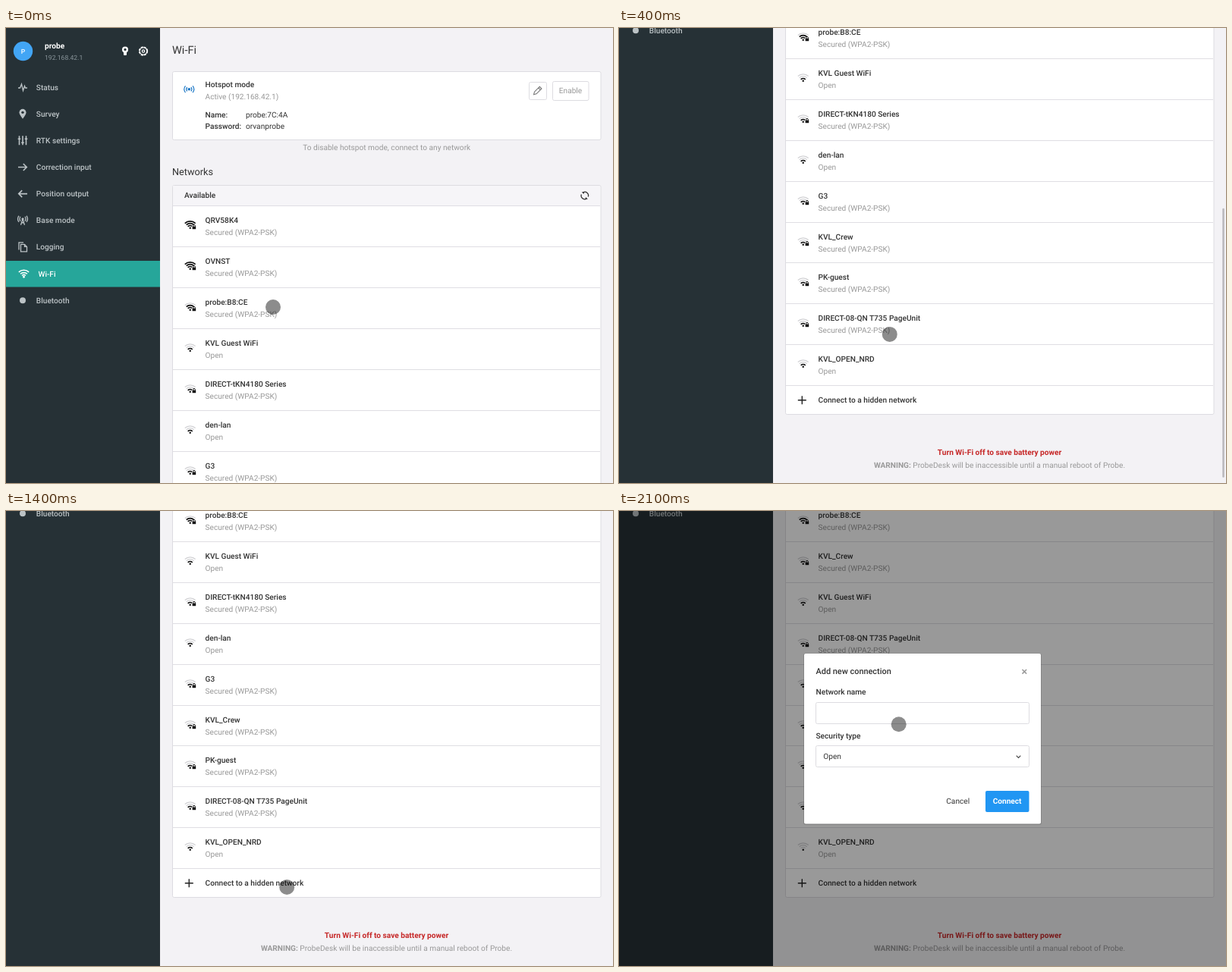
Write an HTML page that moves like this. It is 800 px wide and 600 px high and loops after 2.2 s.

```html
<!DOCTYPE html>
<html lang="en">
<head>
<meta charset="utf-8">
<title>Wi-Fi settings</title>
<style>
  html, body { margin: 0; width: 100%; height: 100%; overflow: hidden; background: #f3f2f5; }
  svg { display: block; width: 800px; height: 600px; }
  text { font: 400 10.15px Roboto, sans-serif; fill: #333; text-rendering: geometricPrecision; white-space: pre; }
  .m { font-weight: 500; }
  .b { font-weight: 700; }
  .g { fill: #999; }
  .c { text-anchor: middle; }
  .nav { font-weight: 500; fill: #bcc3c6; }
  .ip { font-size: 8.6px; fill: #89959a; }
  .h1 { font-size: 14.5px; }
  .h2 { font-size: 12.7px; }
  .dlg { font-size: 10.9px; font-weight: 500; }
  .red { fill: #c62828; }
  .w { fill: #fff; }
  .line { fill: none; stroke: #bcc3c6; stroke-width: 1.3; }
  .box { fill: #fff; stroke: #dddce1; }
</style>
</head>
<body>
<svg id="stage" viewBox="0 0 800 600"></svg>
<script>
const LOOP = 2200, STEP = 100;

const text = (x, y, s, cls = '') => `<text x="${x}" y="${y}" class="${cls}">${s}</text>`;
const rect = (x, y, w, h, fill, more = '') =>
  `<rect x="${x}" y="${y}" width="${w}" height="${h}" fill="${fill}" ${more}/>`;
const box = (x, y, w, h, r = 2) => rect(x + .5, y + .5, w, h, '#fff', `class="box" rx="${r}"`);
const circle = (x, y, r, fill, more = '') => `<circle cx="${x}" cy="${y}" r="${r}" fill="${fill}" ${more}/>`;
const at = (x, y, body) => `<g transform="translate(${x} ${y})">${body}</g>`;
const line = (d, more = '') => `<path d="${d}" class="line" ${more}/>`;
const stroke = (d, color, w) => `<path d="${d}" fill="none" stroke="${color}" stroke-width="${w}"/>`;

// Arc above the origin, spanning 43 degrees to each side
const arc = r => `M${-.68 * r} ${-.73 * r}A${r} ${r} 0 0 1 ${.68 * r} ${-.73 * r}`;

function signal(level, locked) {
  const waves = [4.4, 7.3, 10.2].map((r, i) =>
    level > i ? stroke(arc(r), '#111', 1.7) : stroke(arc(r), '#d2d2d5', 1.3)).join('');
  const lock = rect(2.3, -4.6, 5.8, 5.2, '#fff') + rect(2.9, -3.4, 4.6, 3.6, '#111') +
    stroke('M3.8 -3.2v-1a1.4 1.4 0 0 1 2.8 0v1', '#111', 1);
  return waves + circle(0, -1.2, 1.2, '#111') + (locked ? lock : '');
}

const icons = [
  line('M-6 1h2.5l2 -5l2 8.5l2 -6l1 2.5h2.5'),
  `<path d="M0 6.5C-3 2.5 -4.5 .5 -4.5 -1.8a4.5 4.5 0 0 1 9 0C4.5 .5 3 2.5 0 6.5z" fill="#bcc3c6"/>` + circle(0, -1.8, 1.7, '#263136'),
  line('M-4.5 -6v12M0 -6v12M4.5 -6v12M-6.3 -2h3.6M-1.8 3h3.6M2.7 -2h3.6', 'style="stroke-width:1.6"'),
  line('M-6 0h11M.8 -4.5l4.5 4.5l-4.5 4.5', 'style="stroke-width:1.6"'),
  line('M6 0h-11M-.8 -4.5l-4.5 4.5l4.5 4.5', 'style="stroke-width:1.6"'),
  circle(0, -2, 1.6, '#bcc3c6') + line('M0 -2l-2.5 8M0 -2l2.5 8M-1.5 3h3M-3 -5q-2 3 0 6M3 -5q2 3 0 6M-5 -6q-3 4 0 8M5 -6q3 4 0 8'),
  line('M-2.5 -3.5h5l3 3v6.5h-8zM-5 3.5v-9.5h6M2.5 -3.5v3h3'),
  [9.8, 6.6, 3.5].map(r => at(1.5, 5, stroke(arc(r), '#fff', 1.6))).join('') + circle(1.5, 4.2, 1.4, '#fff'),
  circle(0, 0, 4, '#bcc3c6'),
];
const labels = ['Status', 'Survey', 'RTK settings', 'Correction input', 'Position output',
  'Base mode', 'Logging', 'Wi-Fi', 'Bluetooth'];

const sidebar = circle(22.5, 30.5, 12.7, '#42a5f5') + text(22.5, 33.6, 'P', 'ip m c w') +
  text(51, 26.8, 'probe', 'b w') + text(51, 41.6, '192.168.42.1', 'ip') +
  at(157, 30, circle(0, -1.6, 4, '#fff') + rect(-2, 1, 4, 5, '#fff', 'rx="1"') + circle(0, -1.6, 1.6, '#263136')) +
  at(181, 30.5, circle(0, 0, 5.3, 'none', 'stroke="#fff" stroke-width="1.7" stroke-dasharray="3.2 .96"') +
    circle(0, 0, 4.6, 'none', 'stroke="#fff"') + circle(0, 0, 1.7, 'none', 'stroke="#fff" stroke-width="1.2"')) +
  rect(0, 307, 203, 34.5, '#26a69a') +
  labels.map((s, i) => {
    const y = 78 + 35.15 * i, on = i === 7;
    return at(22, y, icons[i]) + text(on ? 42.5 : 39.8, y + 3.5, s, on ? 'nav w' : 'nav');
  }).join('');

const waves = [1, -1].map(s => stroke(`M${2.6 * s} -2.6q${2 * s} 2.6 0 5.2M${4.8 * s} -4.4q${3.4 * s} 4.4 0 8.8`, '#1976c5', 1.2)).join('');
const hotspot = text(219, 33.7, 'Wi-Fi', 'h1') + box(219, 57, 564.5, 90) +
  at(241.3, 80.8, circle(0, 0, 1.8, '#1976c5') + waves) +
  text(262.6, 78.4, 'Hotspot mode', 'm') + text(262.6, 94, 'Active (192.168.42.1)', 'g') +
  text(262.6, 117.5, 'Name:', 'm') + text(316, 117.5, 'probe:7C:4A') +
  text(262.6, 133, 'Password:', 'm') + text(316, 133, 'orvanprobe') +
  box(689, 71, 23, 23) + box(720, 70, 47.5, 25) + text(744, 86.4, 'Enable', 'c g') +
  at(700.8, 82.5, stroke('M-5.3 5.3l1 -3.6l6.8 -6.8l2.6 2.6l-6.8 6.8zM.9 -3.5l2.6 2.6', '#777', 1.1)) +
  text(501.7, 161, 'To disable hotspot mode, connect to any network', 'c g');

const nets = [['QRV58K4', 3, 1], ['OVNST', 3, 1], ['probe:B8:CE', 2, 1], ['KVL Guest WiFi', 1, 0],
  ['DIRECT-tKN4180 Series', 1, 1], ['den-lan', 1, 0], ['G3', 1, 1], ['KVL_Crew', 1, 1],
  ['PK-guest', 1, 1], ['DIRECT-08-QN T735 PageUnit', 1, 1], ['KVL_OPEN_NRD', 1, 0]];
const resorted = [0, 1, 2, 7, 3, 9, 4, 6, 8, 5].map(i => nets[i]).concat([['KVL_OPEN_NRD', 0, 0]]);

const rowTop = i => Math.round(234 + 53.935 * i);
const rule = y => rect(220, y, 563, 1, '#dfdee3');
const rows = list => list.map(([name, level, locked], i) => at(0, rowTop(i),
  rule(0) + at(242.7, 31, signal(level, locked)) +
  text(262.6, 23, name, 'm') + text(262.6, 39, locked ? 'Secured (WPA2-PSK)' : 'Open', 'g'))).join('');

const networks = text(219, 193.6, 'Networks', 'h2') + box(219, 207, 564.5, 658) +
  rect(220, 208, 563, 26, '#f6f5f8') + text(235, 224.4, 'Available', 'm') +
  at(762.8, 221, stroke('M-2 -4.2A4.6 4.6 0 0 1 4.4 1.6M2 4.2A4.6 4.6 0 0 1 -4.4 -1.6', '#333', 1.3) +
    `<path d="M-4 -4.6l3.4 -.6l-.6 3.3zM4 4.6l-3.4 .6l.6 -3.3z" fill="#333"/>`) +
  `<g id="before">${rows(nets)}</g><g id="after">${rows(resorted)}</g>` +
  rule(rowTop(nets.length)) + at(241.3, 846.7, stroke('M-5.5 0h11M0 -5.5v11', '#222', 1.4)) +
  text(262.6, 850, 'Connect to a hidden network', 'm') +
  text(501.5, 918.8, 'Turn Wi-Fi off to save battery power', 'b c red') +
  text(501.5, 936, '<tspan class="b">WARNING:</tspan> ProbeDesk will be inaccessible until a manual reboot of Probe.', 'c g');

const dialog = rect(0, 0, 800, 600, '#000', 'opacity=".4"') +
  rect(243, 187.5, 314, 226.5, '#000', 'opacity=".12" rx="3"') + rect(244, 188, 312, 224.5, '#fff', 'rx="2"') +
  text(259.5, 215, 'Add new connection', 'dlg') +
  at(534.3, 211.8, stroke('M-2.8 -2.8l5.6 5.6M2.8 -2.8l-5.6 5.6', '#999', 1.5)) +
  text(259.5, 242.4, 'Network name', 'm') + box(259, 252, 281, 28) +
  text(259.5, 299.6, 'Security type', 'm') + box(259, 309, 281, 28) + text(269.3, 326.9, 'Open') +
  at(526.5, 324, stroke('M-2.8 -1.4l2.8 2.8l2.8 -2.8', '#444', 1.2)) +
  text(446.7, 386.4, 'Cancel', 'c') + rect(483, 369, 57.5, 28, '#2196f3', 'rx="2"') +
  text(511.6, 386.4, 'Connect', 'b c w');

const $ = id => document.getElementById(id);
$('stage').innerHTML = rect(0, 0, 800, 600, '#f3f2f5') + rect(0, 0, 203, 600, '#263136') +
  `<g id="page">${sidebar}${hotspot}${networks}</g>` +
  rect(795.3, 0, 2.5, 355, '#b9b8bc', 'id="bar" rx="1.2"') +
  `<g id="dialog">${dialog}</g>` +
  `<g id="pointer">${circle(0, 0, 10, '#000', 'opacity=".45"')}
  ${circle(0, 0, 11, 'none', 'id="ring" stroke="#fff" stroke-width="2"')}</g>`;

const clamp = u => Math.max(0, Math.min(1, u));
const span = (t, a, b) => clamp((t - a) / (b - a));
const smooth = u => u * u * (3 - 2 * u);
const show = (id, on) => $(id).style.display = on ? '' : 'none';

function draw(t) {
  const scroll = 355 * smooth(span(t, 0, 200)) + (t >= 300 ? 1 : 0);
  $('page').setAttribute('transform', `translate(0 ${-scroll})`);
  $('bar').setAttribute('y', 2 + scroll * .662);
  $('bar').setAttribute('opacity', t < 100 ? 0 : 1 - span(t, 600, 900));

  const down = span(t, 200, 600) ** 1.5;
  const settle = 1 - (1 - span(t, 600, 900)) ** 2;
  const up = smooth(span(t, 1700, 2100));
  const x = 352 + 13.5 * down + 4.7 * settle - 1.5 * up;
  const y = 368 + 101.5 * down + 26.5 * settle - 214.8 * up;
  $('pointer').setAttribute('transform', `translate(${x} ${y})`);

  show('dialog', t >= 1500);
  show('before', t < 1900);
  show('after', t >= 1900);
  $('ring').setAttribute('opacity', t < 1500 ? 0 : .65 * (1 - span(t, 1500, 1700)));
}

function tick() {
  draw(Math.floor(performance.now() % LOOP / STEP) * STEP);
  requestAnimationFrame(tick);
}
tick();
</script>
</body>
</html>
```
